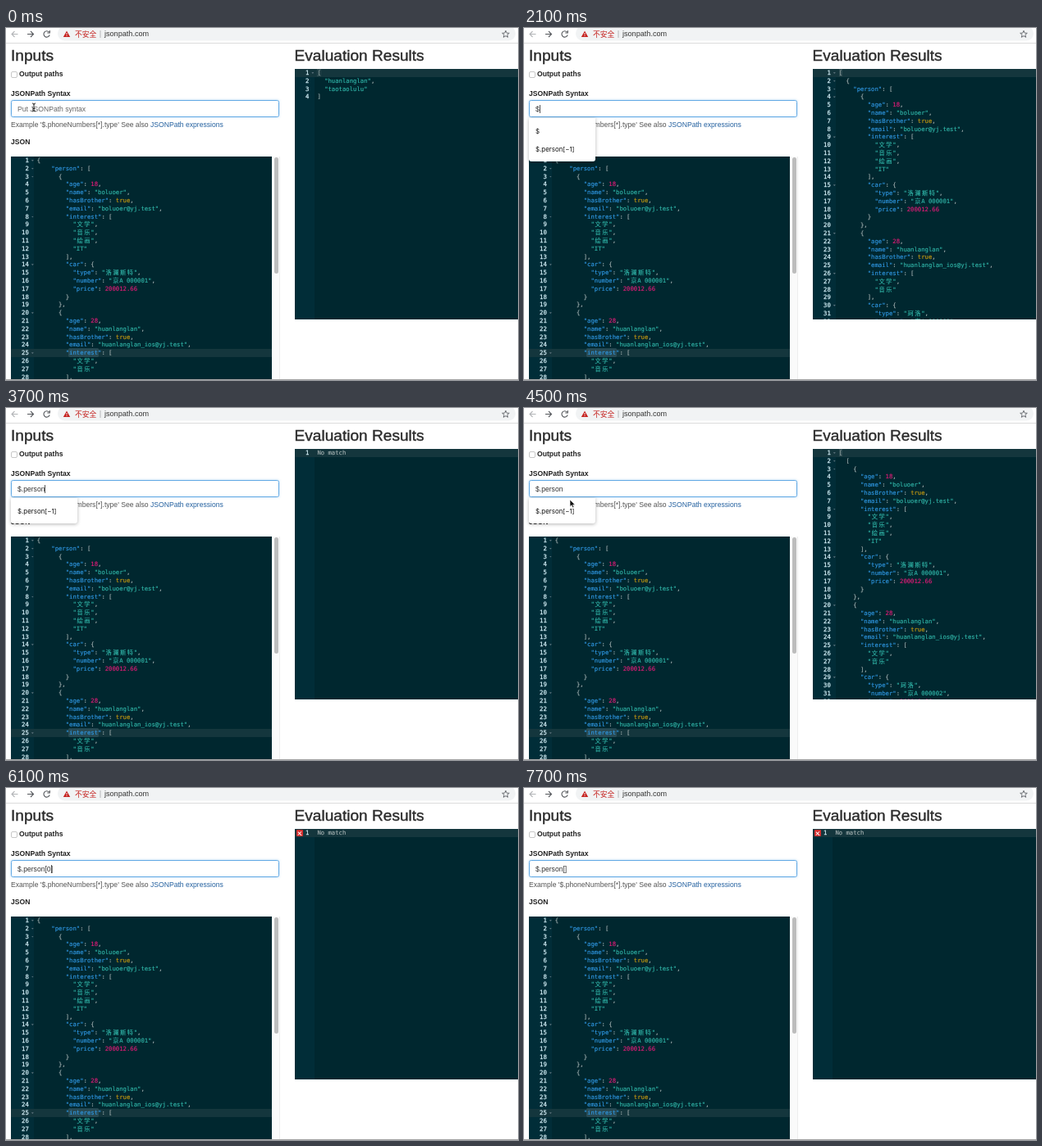
An HTML page for the animation above (8 s loop, 624x430 px).

```html
<!DOCTYPE html>
<html lang="en">
<head>
<meta charset="utf-8">
<title>JSONPath evaluator</title>
<style>
html, body { margin: 0; width: 100%; height: 100%; overflow: hidden; background: #fff; }
body { position: relative; font: 8.6px/12px "Liberation Sans", Arial, sans-serif; color: #333; }
body > * { position: absolute; white-space: pre; }
h1 { margin: 0; top: 23px; font-size: 19.1px; line-height: 22px; font-weight: 400; color: #2b2b2b; -webkit-text-stroke: .4px #2b2b2b; }
b { color: #222; left: 6px; }
#bar { left: 0; top: 0; }
.zh { left: 84px; top: 1px; font: 8.8px/13px "Noto Sans CJK SC", "Noto Sans CJK", sans-serif; color: #c5221f; }
.url { left: 120px; top: 1px; font-size: 9.1px; line-height: 13px; }
.check { left: 6px; top: 52.5px; width: 6px; height: 6px; border: 1px solid #c8c8c8; border-radius: 2px; }
.field { left: 6px; top: 88px; width: 325px; height: 19px; border: 1px solid #62a9e4; border-radius: 2.5px; box-shadow: 0 0 3px rgba(102,175,233,.5); }
#typed { left: 14px; top: 93px; }
#typed.empty { color: #666; }
#caret { display: inline-block; width: 1px; height: 10px; margin-right: -1px; vertical-align: -2px; background: #555; }
.hint { left: 6px; top: 112px; color: #555; }
.hint span { color: #23609f; }
.editor { background: #00272f; color: #a3b1b1; overflow: hidden; font: 7.25px/9.8px "DejaVu Sans Mono", "Noto Sans CJK SC", "Noto Sans CJK", monospace; -webkit-text-stroke: .15px; }
#left { left: 6px; top: 157px; width: 318px; height: 273px; }
.result { left: 352px; top: 50px; width: 272px; height: 306px; }
.gutter { position: absolute; left: 0; top: 0; bottom: 0; background: #012d38; }
.row { position: relative; height: 9.8px; }
.row.active { background: #14363d; }
.num { position: absolute; right: 100%; color: #d8f2fa; -webkit-text-stroke: .25px; }
.code { position: absolute; top: 0; }
.fold { position: absolute; top: 4px; width: 3px; height: 2px; background: #587079; clip-path: polygon(0 0, 100% 0, 50% 100%); }
.key { color: #2f97e2; } .str { color: #30b5a8; } .lit { color: #c79a10; } .val { color: #e01c78; }
.editor i { display: inline-block; width: 2ch; text-align: center; font-style: normal; }
.word { background: #284a54; box-shadow: 0 0 0 .5px #3f5f68; }
.match { box-shadow: inset 0 0 0 .7px rgba(147,161,161,.25); }
.error { position: absolute; left: 2px; top: 1px; width: 8px; height: 8px; background: #d32f2f; border-radius: 1px; }
.error::before, .error::after { content: ""; position: absolute; left: 1.2px; top: 3.5px; width: 5.6px; height: 1.1px; background: #fff; transform: rotate(45deg); }
.error::after { transform: rotate(-45deg); }
.track { left: 324px; top: 157px; width: 9px; height: 273px; background: #fafafa; border-right: 1px solid #eee; }
.thumb { left: 326.5px; top: 158px; width: 5px; height: 142px; border-radius: 3px; background: #bdbdbd; }
.foot { left: 0; top: 429px; width: 100%; height: 1px; background: #a5a5a5; }
#menu { left: 6px; top: 110px; width: 81px; background: #fff; border-radius: 0 0 3px 3px; box-shadow: 0 1px 4px rgba(0,0,0,.3); font: 7.9px/22px Inter, sans-serif; color: #111; padding: 5px 0 4px; }
#menu div { padding-left: 8px; height: 22px; }
#beam, #arrow { left: 0; top: 0; overflow: visible; }
</style>
</head>
<body>
<svg id="bar" width="624" height="19" fill="none" stroke-width="1.1">
  <rect x="63" y="-2" width="558" height="17.5" rx="8.5" fill="#f1f3f4"/>
  <path d="M0 18.5H624" stroke="#dcdcdc" stroke-width="1"/>
  <path d="M14.500 7.500H7M10.500 4L7 7.500L10.500 11" stroke="#b3b5b8"/>
  <path d="M26 7.500H33.500M30 4L33.500 7.500L30 11" stroke="#55585c"/>
  <path d="M52.500 5A3.700 3.700 0 1 0 53.200 8.500M53.300 3V6H50.300" stroke="#55585c"/>
  <path d="M74 3.500L78.200 11H69.800Z" fill="#c5221f"/>
  <path d="M74 6V8.300M74 9V10" stroke="#fff" stroke-width=".9"/>
  <path d="M115 3V12" stroke="#b5b7ba" stroke-width="1"/>
  <path d="M609 3.200L610.200 6.100L613.300 6.300L610.900 8.300L611.700 11.300L609 9.700L606.300 11.300L607.100 8.300L604.700 6.300L607.800 6.100Z" stroke="#5f6368" stroke-width=".9"/>
</svg>
<span class="zh">不安全</span>
<span class="url">jsonpath.com</span>
<h1 style="left:6px">Inputs</h1>
<h1 style="left:351.500px">Evaluation Results</h1>
<div class="check"></div>
<b style="left:16px;top:50px">Output paths</b>
<b style="top:73.500px">JSONPath Syntax</b>
<div class="field"></div>
<div id="typed"></div>
<div class="hint">Example '$.phoneNumbers[*].type' See also <span>JSONPath expressions</span></div>
<b style="top:133px">JSON</b>
<div id="left" class="editor"></div>
<div class="track"></div>
<div class="thumb"></div>
<div class="foot"></div>
<div id="menu"><div>$</div><div>$.person[−1]</div></div>
<svg id="beam" width="8" height="12" fill="none" stroke="#222" stroke-width="1"><path d="M-2 -5Q0 -5 0 -3.500Q0 -5 2 -5M0 -4V4M-2 5Q0 5 0 3.500Q0 5 2 5M-1 1.500H1"/></svg>
<svg id="arrow" width="8" height="12"><path d="M0 0V8.500L2 6.700L3.400 9.800L4.900 9.100L3.500 6.200H6.200Z" fill="#111" stroke="#fff" stroke-width=".6"/></svg>
<script>
const LOOP = 8000, STEP = 100;
const $ = id => document.getElementById(id);

const person = (age, name, email, interest, type, number, price) =>
  ({ age, name, hasBrother: true, email, interest, car: { type, number, price } });
const people = [
  person(18, 'boluoer', 'boluoer@yj.test', ['文学', '音乐', '绘画', 'IT'], '洛澜斯特', '京A 000001', 200012.66),
  person(28, 'huanlanglan', 'huanlanglan_ios@yj.test', ['文学', '音乐'], '珂洛', '京A 000002', 300012.66)
];
const doc = { person: people };
const format = value => JSON.stringify(value, null, 2).split('\n');

function paint(line) {
  return line
    .replace(/("[^"]*")(:?)|\b(true|false)\b|\b(\d[\d.]*)/g, (m, str, colon, lit, num) =>
      str ? `<span class="${colon ? 'key' : 'str'}">${str}</span>${colon}`
        : `<span class="${lit ? 'lit' : 'val'}">${lit || num}</span>`)
    .replace(/[\u4e00-\u9fff]/g, '<i>$&</i>');
}

function fillEditor(el, lines, active, error) {
  const wide = lines.length > 9 ? 4.4 : 0;
  const numX = 17.4 + wide, foldX = 20.4 + wide, codeX = 27.4 + wide;
  el.innerHTML = `<div class="gutter" style="width:${23.6 + wide}px"></div>` + lines.map((line, i) => {
    const fold = /[[{]$/.test(line) ? `<div class="fold" style="left:${foldX}px"></div>` : '';
    const mark = error && i === 0 ? '<div class="error"></div>' : '';
    return `<div class="row${i + 1 === active ? ' active' : ''}">${mark}` +
      `<span class="num" style="right:calc(100% - ${numX}px)">${i + 1}</span>${fold}` +
      `<span class="code" style="left:${codeX}px">${/^[A-Z]/.test(line) ? line : paint(line)}</span></div>`;
  }).join('');
}

function addResult(lines, error) {
  const el = document.createElement('div');
  el.className = 'editor result';
  fillEditor(el, lines, 1, error);
  const first = el.querySelector('.code');
  if (first.textContent === '[') first.innerHTML = '<span class="match">[</span>';
  $('left').after(el);
  return el;
}

fillEditor($('left'), format(doc).map((line, i) => i ? '  ' + line : line), 25);
const word = $('left').querySelectorAll('.row')[24].querySelector('.key');
word.innerHTML = '"<span class="word">interest</span>"';

const none = ['No match'];
const results = {
  names: addResult(format(['huanlanglan', 'taotaolulu'])),
  all: addResult(format([doc])),
  people: addResult(format([people])),
  first: addResult(format([people[0]])),
  none: addResult(none),
  error: addResult(none, true)
};

// Each track is a list of [start time, value].
const texts = [[0, ''], [700, '$'], [2200, '$.'], [2800, '$.p'], [3000, '$.pe'], [3400, '$.pers'],
  [3500, '$.perso'], [3700, '$.person'], [5300, '$.person['], [5700, '$.person[]'],
  [6100, '$.person[0]'], [7000, '$.person[]']];
const panels = [[0, 'names'], [800, 'all'], [2900, 'none'], [3800, 'people'], [5400, 'error'],
  [6200, 'first'], [7100, 'none'], [7400, 'error']];
const menus = [[0, 0], [700, 2], [2200, 1], [4900, 0]];
const carets = [[0, 0], [700, 1], [1200, 0], [1700, 1], [2700, 0], [2800, 1], [4200, 0], [4600, 1],
  [5200, 0], [5300, 1], [6600, 0], [7000, 1], [7600, 0]];
const path = [[4000, 34, 97], [4200, 36, 99], [4500, 56, 112], [4700, 92, 141], [4900, 104, 147], [5200, 70, 101.5]];

const at = (track, t) => track.reduce((v, k) => k[0] <= t ? k[1] : v, track[0][1]);

function pointer(t) {
  if (t < 700) return [34, 97];
  if (t < 4000 || t >= 5700) return null;
  const i = path.findIndex(p => p[0] > t);
  if (i < 0) return path[path.length - 1].slice(1);
  const a = path[i - 1], b = path[i], k = (t - a[0]) / (b[0] - a[0]);
  return [a[1] + (b[1] - a[1]) * k, a[2] + (b[2] - a[2]) * k];
}

function show(el, on) { el.style.visibility = on ? 'visible' : 'hidden'; }

function render(t) {
  const text = at(texts, t), cut = text.endsWith(']') ? -1 : text.length;
  $('typed').className = text ? '' : 'empty';
  $('typed').innerHTML = text
    ? text.slice(0, cut) + (at(carets, t) ? '<span id="caret"></span>' : '') + text.slice(cut)
    : 'Put JSONPath syntax';

  const panel = at(panels, t);
  for (const name in results) show(results[name], name === panel);

  const items = at(menus, t);
  show($('menu'), items);
  $('menu').firstElementChild.style.display = items === 2 ? '' : 'none';

  const pos = pointer(t), inField = pos && pos[1] > 88 && pos[1] < 109;
  show($('beam'), inField);
  show($('arrow'), pos && !inField);
  if (pos) $(inField ? 'beam' : 'arrow').style.transform = `translate(${pos[0]}px, ${pos[1]}px)`;
}

let last = -1;
function tick() {
  const t = Math.floor(performance.now() % LOOP / STEP) * STEP;
  if (t !== last) render(last = t);
  requestAnimationFrame(tick);
}
tick();
</script>
</body>
</html>
```
